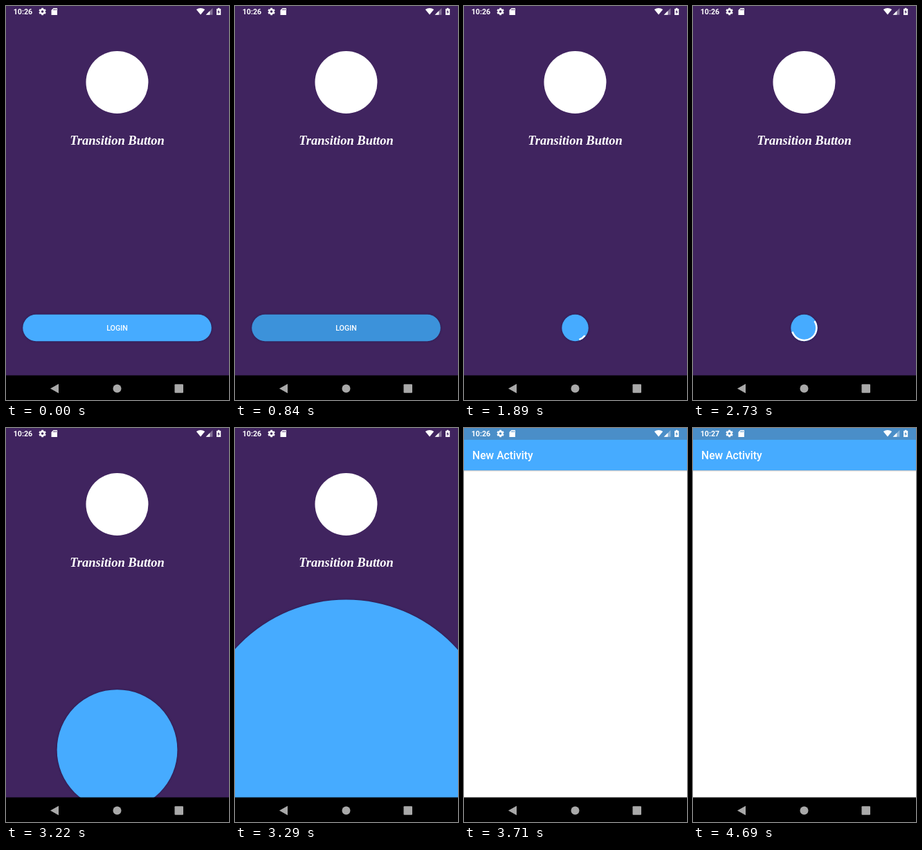
Animation of 322 by 568 pixels, one loop 5.11 s. Source, as an HTML page with a canvas:

```html
<!DOCTYPE html>
<html lang="en">
<head>
<meta charset="utf-8">
<title>Transition Button</title>
<style>
  html, body { margin: 0; width: 100%; height: 100%; overflow: hidden; background: #000; }
  canvas { display: block; }
</style>
</head>
<body>
<canvas id="stage" width="322" height="568"></canvas>
<script>
const ctx = document.getElementById('stage').getContext('2d');
const W = 322, H = 568, LOOP = 5110, TAU = Math.PI * 2;
const BLUE = '#46abff', PURPLE = '#40245f', GREY = '#a9a9a9';
const CX = 160.5, CY = 464, R = 19.2, FULL = 136.25;

const PRESS = 250, SHRINK = 950, SPIN = 1330, EXPAND = 3131;
const COVERED = 3430, ACTIVITY = 3710, MINUTE = 4690;

const progress = (t, start, length) => Math.min(1, Math.max(0, (t - start) / length));
const ease = p => 0.5 - Math.cos(p * Math.PI) / 2;
const decelerate = p => 1 - (1 - p) ** 2;

function rect(color, x, y, w, h) {
  ctx.fillStyle = color;
  ctx.fillRect(x, y, w, h);
}

function disc(color, x, y, r) {
  ctx.fillStyle = color;
  ctx.beginPath();
  ctx.arc(x, y, r, 0, TAU);
  ctx.fill();
}

function poly(color, ...xy) {
  ctx.fillStyle = color;
  ctx.beginPath();
  for (let i = 0; i < xy.length; i += 2) ctx.lineTo(xy[i], xy[i + 1]);
  ctx.fill();
}

function text(str, x, y, font, align = 'left') {
  ctx.fillStyle = '#fff';
  ctx.font = font;
  ctx.textAlign = align;
  ctx.fillText(str, x, y);
}

function gear(x, y, hole) {
  ctx.save();
  ctx.translate(x, y);
  for (let i = 0; i < 3; i++) {
    rect('#fff', -1.4, -5.2, 2.8, 10.4);
    ctx.rotate(Math.PI / 3);
  }
  ctx.restore();
  disc('#fff', x, y, 4.1);
  disc(hole, x, y, 1.8);
}

function statusBar(t, back) {
  const weight = t >= COVERED && t < ACTIVITY ? 400 : 700;
  text(t < MINUTE ? '10:26' : '10:27', 10.7, 12, weight + ' 10.7px Roboto, sans-serif');
  gear(52.6, 8, back);

  // memory card
  poly('#fff', 68.5, 3, 74, 3, 74, 13, 65.5, 13, 65.5, 6);
  for (const x of [68.4, 70.2, 72]) rect(back, x, 4.2, 0.9, 2);

  // wifi
  ctx.fillStyle = '#fff';
  ctx.beginPath();
  ctx.moveTo(281, 12.5);
  ctx.lineTo(274.8, 5);
  ctx.quadraticCurveTo(281, 0.8, 287.2, 5);
  ctx.fill();

  // signal
  poly('rgba(255,255,255,.35)', 288.6, 12.8, 298.4, 12.8, 298.4, 3);
  poly('#fff', 288.6, 12.8, 294.4, 12.8, 294.4, 7);

  // battery
  rect('#fff', 304, 4, 6.2, 9);
  rect('#fff', 305.8, 2.9, 2.6, 1.4);
  poly(back, 307.6, 5.2, 305.3, 9, 306.8, 9, 306.6, 11.8, 308.9, 8, 307.4, 8);
}

function navBar(color) {
  rect('#000', 0, 532.5, W, 35.5);
  poly(color, 64, 551.5, 76, 544.8, 76, 558.2);
  disc(color, 160.5, 551.5, 6);
  ctx.beginPath();
  ctx.roundRect(243.5, 545.3, 12.5, 12.5, 1);
  ctx.fill();
}

function spinner(t) {
  const age = t - SPIN, turn = 620, cycle = Math.floor(age / turn);
  const swing = 300 * decelerate(age % turn / turn);
  const growing = cycle % 2 === 1;
  let start = age * 0.18 - 60 * Math.ceil(cycle / 2);
  let sweep = swing + 30;
  if (!growing) {
    start += swing;
    sweep = 330 - swing;
  }
  const rad = Math.PI / 180;
  ctx.strokeStyle = '#fff';
  ctx.lineWidth = 2.5;
  ctx.beginPath();
  ctx.arc(CX, CY, 17.9, start * rad, (start + sweep) * rad);
  ctx.stroke();
}

function button(t) {
  const half = FULL + (R - FULL) * ease(progress(t, SHRINK, 380));
  const grow = 577 * ease(progress(t, EXPAND, 400));
  const w = half + grow, r = R + grow;

  ctx.save();
  ctx.shadowColor = 'rgba(10,20,70,.6)';
  ctx.shadowBlur = 3;
  ctx.fillStyle = BLUE;
  ctx.beginPath();
  ctx.roundRect(CX - w, CY - r, w * 2, r * 2, r);
  ctx.fill();
  ctx.restore();

  const fade = 1 - progress(t, 1130, 200);
  const press = progress(t, PRESS, 310);
  if (press && fade) {
    ctx.save();
    ctx.clip();
    ctx.globalAlpha = 0.075 * fade * press;
    rect('#000', 0, CY - R, W, R * 2);
    ctx.globalAlpha = 0.08 * fade;
    disc('#000', CX, CY, 140 * decelerate(press));
    ctx.restore();
  }

  if (t < SHRINK) text('LOGIN', CX, 468, '500 10.7px Roboto, sans-serif', 'center');
  if (t >= SPIN && t < EXPAND) spinner(t);
}

function loginScreen(t) {
  rect(PURPLE, 0, 0, W, H);
  disc('#fff', CX, 110, 45);
  text('Transition Button', CX, 200, 'italic bold 18.5px "Liberation Serif", serif', 'center');
  button(t);
  statusBar(t, PURPLE);
  navBar(GREY);
}

function blueScreen(t) {
  rect(BLUE, 0, 0, W, H);
  statusBar(t, BLUE);
  navBar(BLUE);
}

function activityScreen(t) {
  rect('#fff', 0, 0, W, H);
  rect(BLUE, 0, 17, W, 44);
  rect('#4a8ec8', 0, 0, W, 17);
  rect('rgba(0,0,0,.2)', 0, 61, W, 1);
  rect('rgba(0,0,0,.06)', 0, 62, W, 1);
  text('New Activity', 12, 45.3, '500 15.7px Roboto, sans-serif');
  statusBar(t, '#4a8ec8');
  navBar(GREY);
}

function draw(now) {
  const t = now % LOOP;
  if (t < COVERED) loginScreen(t);
  else if (t < ACTIVITY) blueScreen(t);
  else activityScreen(t);
}

let begin;
function tick(now) {
  begin ??= now;
  draw(now - begin);
  requestAnimationFrame(tick);
}
requestAnimationFrame(tick);
</script>
</body>
</html>
```
